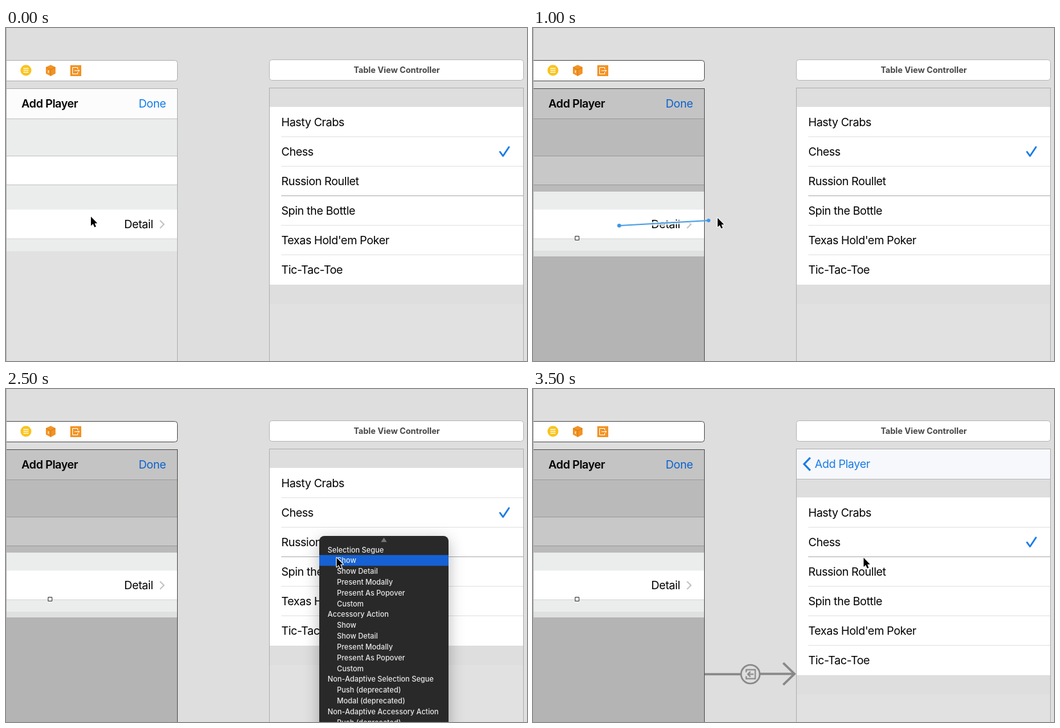
These frames come from a looping animation (810x519 px, 4 s). An HTML page with a canvas:

```html
<!DOCTYPE html>
<html lang="en">
<head>
<meta charset="utf-8">
<title>Connecting a cell to a table view</title>
<style>
html, body { margin: 0; width: 100%; height: 100%; overflow: hidden; background: #dededf; }
canvas { display: block; width: 810px; height: 519px; }
</style>
</head>
<body>
<canvas id="stage" width="810" height="519"></canvas>
<script>
const ctx = document.getElementById('stage').getContext('2d');
const STEP = 500;
const ROW = 46.15;
const BLUE = '#1a7ce6';
const GAMES = ['Hasty Crabs', 'Chess', 'Russion Roullet', 'Spin the Bottle',
  "Texas Hold'em Poker", 'Tic-Tac-Toe'];
const SEGUES = ['Show', 'Show Detail', 'Present Modally', 'Present As Popover', 'Custom'];
const OLD_SEGUES = ['Push (deprecated)', 'Modal (deprecated)'];
const MENU = [['Selection Segue', SEGUES], ['Accessory Action', SEGUES],
  ['Non-Adaptive Selection Segue', OLD_SEGUES],
  ['Non-Adaptive Accessory Action', OLD_SEGUES]];

const STATES = [
  { cursor: [132, 294] },
  { cursor: [133, 304], selected: true },
  { cursor: [287, 296], selected: true, drag: [273, 300], width: 2 },
  { cursor: [453, 259], selected: true, drag: [436, 264], width: 1.5, target: true },
  { cursor: [489, 249], selected: true, menu: true },
  { cursor: [514, 263], selected: true, menu: true, hover: 1 },
  { cursor: [514, 263], selected: true },
  { cursor: [514, 263], selected: true, linked: true }
];

function box(x, y, w, h, color) {
  ctx.fillStyle = color;
  ctx.fillRect(x, y, w, h);
}

function rounded(x, y, w, h, r, fill, stroke) {
  ctx.beginPath();
  ctx.roundRect(x, y, w, h, r);
  ctx.fillStyle = fill;
  ctx.fill();
  if (!stroke) return;
  ctx.strokeStyle = stroke;
  ctx.lineWidth = 1;
  ctx.stroke();
}

function dot(x, y, r, color) {
  ctx.fillStyle = color;
  ctx.beginPath();
  ctx.arc(x, y, r, 0, Math.PI * 2);
  ctx.fill();
}

function trace(points) {
  ctx.beginPath();
  points.forEach(([x, y]) => ctx.lineTo(x, y));
}

function line(points, color, width, cap = 'butt') {
  trace(points);
  ctx.strokeStyle = color;
  ctx.lineWidth = width;
  ctx.lineCap = cap;
  ctx.lineJoin = cap === 'round' ? 'round' : 'miter';
  ctx.stroke();
}

function shape(points, color) {
  trace(points);
  ctx.closePath();
  ctx.fillStyle = color;
  ctx.fill();
}

function text(str, x, y, { size = 17.6, weight = 400, color = '#000', align = 'left', track = -0.42 } = {}) {
  ctx.font = `${weight} ${size}px Inter, "Liberation Sans", sans-serif`;
  ctx.letterSpacing = track + 'px';
  ctx.textAlign = align;
  ctx.fillStyle = color;
  ctx.fillText(str, x, y);
}

function dockIcons() {
  dot(31, 66, 8.5, '#f8c41d');
  for (const y of [63, 66, 69]) line([[27, y], [35, y]], '#fff', 1.3);

  shape([[69.5, 57.5], [77, 61], [77, 71], [69.5, 75], [62, 71], [62, 61]], '#f29325');
  line([[62.5, 61.5], [69.5, 65], [76.5, 61.5]], '#d57a12', 1);
  line([[69.5, 65], [69.5, 74.5]], '#d57a12', 1);
  box(65, 66, 2, 4, '#fbd5a2');

  box(100, 58, 17, 17, '#f29325');
  line([[111.5, 64], [111.5, 61.5], [103.5, 61.5], [103.5, 71.5], [111.5, 71.5], [111.5, 69]], '#fff', 1);
  line([[106.5, 66.5], [114, 66.5]], '#fff', 1);
  line([[112, 64.5], [114, 66.5], [112, 68.5]], '#fff', 1);
}

function playerScene(selected) {
  const edge = selected ? '#505050' : '#b0b0b0';
  const rule = selected ? '#9b9b9b' : '#c3c3c3';
  const tone = selected
    ? { nav: '#c4c4c4', gap: '#bababa', cell: '#c8c8c8', strip: '#bababa', rest: '#b4b4b4' }
    : { nav: '#fcfcfc', gap: '#ebeded', cell: '#fff', strip: '#ebeded', rest: '#e1e1e1' };

  rounded(-9.5, 50.5, 276, 32, 4, '#fff', edge);
  dockIcons();

  box(0, 95, 266, 424, tone.rest);
  box(0, 95, 266, 46, tone.nav);
  box(0, 141, 266, 58, tone.gap);
  box(0, 199, 266, 46, tone.cell);
  box(0, 245, 266, 38, tone.strip);
  for (const y of [141, 199, 244]) box(0, y, 266, 1, rule);
  if (selected) {
    box(0, 255, 266, 101, '#ebeded');
    box(0, 347, 266, 9, '#dfe0e0');
  } else {
    box(0, 328, 266, 20, '#ebeded');
  }
  box(0, 283, 266, 45, '#fff');
  box(0, 328, 266, 1, '#d6d8d8');
  box(0, 94, 267, 1, edge);
  box(266, 94, 1, 425, edge);

  text('Add Player', 24, 124, { weight: 600 });
  text('Done', 248.5, 124, { color: selected ? '#0c62cc' : '#0f7be8', align: 'right' });
  text('Detail', 228.5, 312, { align: 'right' });
  line([[239.5, 300], [245.5, 306], [239.5, 312]], '#c3c3c6', 2);

  if (selected) {
    rounded(65.5, 324.5, 6, 6, 0, '#fff', '#333');
  }
}

function gameScene(linked) {
  const top = linked ? 169 : 123;
  rounded(409.5, 49.5, 395, 32, 4, '#fff', '#b8b8b8');
  text('Table View Controller', 607.5, 70,
    { size: 12.8, weight: 700, color: '#484848', align: 'center', track: 0 });

  box(410, 93, 394, 426, '#e1e1e2');
  box(410, 93, 394, top + 307 - 93, '#dededf');
  box(410, top, 394, 277, '#fff');
  GAMES.forEach((name, i) => {
    const y = top + i * ROW;
    if (i) {
      const ruleY = Math.floor(y);
      box(428, ruleY, 376, 1, ruleY === 261 ? '#adadad' : '#e2e2e3');
    }
    text(name, 428, y + 29.7);
  });
  const tick = top + 46;
  line([[768, tick + 24], [772.7, tick + 30.5], [782, tick + 16.5]], BLUE, 2.6, 'round');

  if (linked) {
    box(410, 94, 394, 46, '#f7f8fb');
    box(410, 140, 394, 1, '#b9b9ba');
    line([[431, 107], [421.5, 117], [431, 127]], BLUE, 3);
    text('Add Player', 438, 123.3, { color: BLUE });
  }
  box(409, 93, 396, 1, '#b0b0b0');
  box(409, 93, 1, 426, '#b0b0b0');
  box(804, 93, 1, 426, '#b0b0b0');
}

function segueArrow() {
  const gray = '#88888a';
  line([[267, 444.5], [324, 444.5]], gray, 3.5);
  line([[353, 444], [407, 444]], gray, 3.5);
  line([[389, 427], [406.5, 444], [389, 461]], gray, 3.5);
  ctx.beginPath();
  ctx.arc(338, 444.5, 14.5, 0, Math.PI * 2);
  ctx.lineWidth = 2.5;
  ctx.stroke();
  line([[331.5, 441.5], [331.5, 437.5], [345.5, 437.5], [345.5, 451.5], [331.5, 451.5], [331.5, 447.5]], gray, 2);
  line([[334, 444.5], [343, 444.5]], gray, 2);
  line([[338, 440.5], [334, 444.5], [338, 448.5]], gray, 2);
}

function dragLine(end, width) {
  const start = [134, 308];
  ctx.save();
  ctx.beginPath();
  ctx.rect(0, 283, 266, 45);
  ctx.clip();
  line([start, end], 'rgba(255,255,255,.75)', 6);
  ctx.restore();
  line([start, end], '#4a9fe6', width);
  dot(...start, 3, '#3d97e6');
  dot(...end, 2.8, '#3d97e6');
}

function segueMenu(hover) {
  ctx.save();
  ctx.shadowColor = 'rgba(0,0,0,.28)';
  ctx.shadowBlur = 24;
  ctx.shadowOffsetY = 6;
  rounded(487, 229, 201, 320, 8, '#292929');
  ctx.restore();
  shape([[583, 238.5], [587.5, 231.5], [592, 238.5]], '#777');

  let row = 0;
  const item = (label, x) => {
    const y = 250.3 + row * 16.82;
    if (row === hover) box(487, y - 8.4, 201, 16.8, '#1662d4');
    text(label, x, y + 4.2, { size: 11.25, weight: 500, color: '#e9e9e9', track: 0 });
    row++;
  };
  for (const [title, kinds] of MENU) {
    item(title, 500);
    kinds.forEach(kind => item(kind, 514.5));
  }
}

function pointer(x, y) {
  const arrow = [[0, 0], [0, 14.3], [3.3, 11.3], [5.6, 16.6], [8, 15.6], [5.8, 10.4], [10, 10.2]]
    .map(([dx, dy]) => [x + dx, y + dy]);
  trace(arrow);
  ctx.closePath();
  ctx.strokeStyle = '#fff';
  ctx.lineWidth = 2;
  ctx.lineJoin = 'round';
  ctx.stroke();
  shape(arrow, '#000');
}

function render(now) {
  const state = STATES[Math.floor(now / STEP) % STATES.length];
  box(0, 0, 810, 519, '#dededf');
  playerScene(state.selected);
  gameScene(state.linked);
  box(0, 0, 1, 519, '#b2b2b2');
  if (state.linked) segueArrow();
  if (state.target) box(405, 89, 405, 430, 'rgba(55,127,239,.25)');
  if (state.drag) dragLine(state.drag, state.width);
  if (state.menu) segueMenu(state.hover);
  pointer(...state.cursor);
}

const began = performance.now();
function loop() {
  render(performance.now() - began);
  requestAnimationFrame(loop);
}
loop();
</script>
</body>
</html>
```
